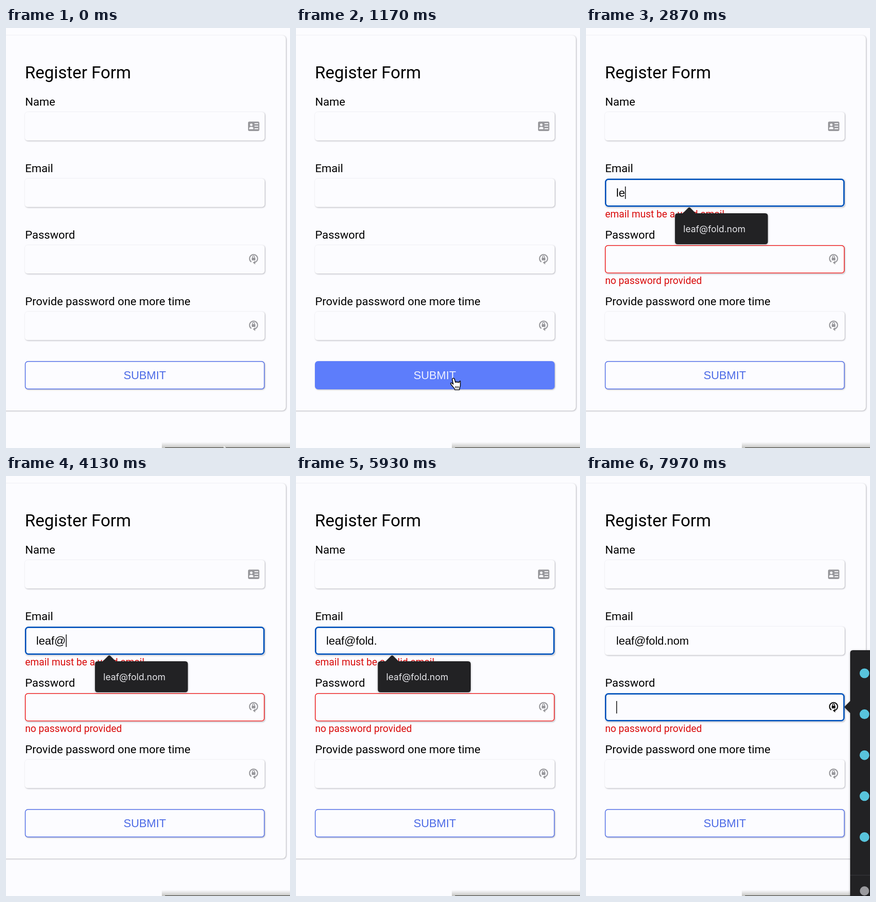
An HTML page that plays this animation: 616 px wide and 909 px high, repeating every 8 s.

```html
<!DOCTYPE html>
<html lang="en">
<head>
<meta charset="utf-8">
<title>Register form</title>
<style>
  html, body { margin: 0; width: 100%; height: 100%; overflow: hidden; background: #fcfcff; }
  svg { display: block; width: 100vw; height: 100vh; }
  text { font-family: Roboto, sans-serif; font-size: 24.5px; white-space: pre; }
  .title { font-size: 36.9px; }
  .error { font-size: 21.4px; fill: #d90b0b; }
  .arial { font-family: "Liberation Sans", Arial, sans-serif; font-size: 24.4px; }
  .hint { font-family: Inter, sans-serif; font-size: 19.6px; fill: #e6e6ea; }
  .card { fill: #fcfcff; filter: drop-shadow(1px 1px 1.5px rgba(40, 40, 50, .36)); }
  .dark { fill: #222224; filter: drop-shadow(0 1px 2px rgba(0, 0, 0, .3)); }
</style>
</head>
<body>
<svg id="stage" viewBox="0 0 616 909" preserveAspectRatio="none">
  <defs>
    <linearGradient id="fade" x2="0" y2="1">
      <stop offset="0" stop-color="#77776c" stop-opacity="0"/>
      <stop offset="1" stop-color="#77776c" stop-opacity=".42"/>
    </linearGradient>
    <g id="person">
      <rect x="525" y="202.5" width="24.5" height="20.5" rx="3" fill="#98989c"/>
      <g fill="#fcfcff">
        <circle cx="532" cy="209.5" r="2.7"/>
        <path d="M527.5 219v-2q0-3 4.500-3t4.500 3v2z"/>
        <path d="M539 206h8v2h-8zM539 211.500h8v2h-8zM539 217h8v2h-8z"/>
      </g>
    </g>
    <g id="lock">
      <path d="M-4.800 7.300A8.700 8.700 0 1 1 5 7.100Q3 8.600 0 8.700" fill="none" stroke="currentColor" stroke-width="2.300"/>
      <path d="M-1.500 8.700L3.500 4.700V12.700Z" fill="currentColor"/>
      <rect x="-4" y="-2" width="8" height="6" rx="1" fill="currentColor"/>
      <path d="M-2.300-2v-1.500a2.300 2.300 0 0 1 4.600 0V-2" fill="none" stroke="currentColor" stroke-width="1.500"/>
    </g>
  </defs>

  <rect width="616" height="909" fill="#fcfcff"/>
  <rect class="card" x="-30" y="16" width="637" height="812" rx="8"/>
  <rect x="338" y="896" width="278" height="13" fill="url(#fade)"/>
  <rect x="345" y="907.7" width="271" height="1.3" fill="#4b4b45"/>
  <text class="title" x="41" y="109">Register Form</text>
  <g id="form"></g>
  <use href="#person"/>
  <use id="lock1" href="#lock" x="537" y="499"/>
  <use href="#lock" x="537" y="643" color="#98989c"/>

  <rect id="button" class="card" x="41.750" y="721.750" width="518.500" height="59.500" rx="6" stroke-width="1.500"/>
  <text id="submit" class="arial" x="301" y="760" text-anchor="middle">SUBMIT</text>

  <text id="typed" class="arial" x="65.500" y="365"></text>
  <rect id="caret" width="1.600" height="27"/>
  <text id="emailError" class="error" x="41.500" y="409.500"></text>
  <text id="passError" class="error" x="41.500" y="553.500">no password provided</text>

  <g id="arrow">
    <path d="M0 0V21.500L5 17L8.800 25.500L12.800 23.700L9.200 15.500H16Z" fill="#000" stroke="#fff" stroke-width="1.500"/>
  </g>
  <g id="hand">
    <path d="M-2 1Q-2.500-2 .5-2Q2.500-2 3.200 1L4.800 7Q7 4.700 8.700 7Q11 5 12.500 7.500Q16-.5 15.500 9.500V14Q14 17 13.500 23H3.500Q2.500 19-1 16L-5 11Q-6.500 7.500-3.500 8L0 11Z"
      fill="#fff" stroke="#000" stroke-width="1.600" stroke-linejoin="round"/>
    <path d="M5 15v5M8 15v5M11 15v5" stroke="#000" stroke-width="1.200"/>
  </g>

  <g id="popup">
    <path class="dark" d="M199 401H210L221.500 389.500Q224 387 226.500 389.500L238 401H388.500Q394.500 401 394.500 407V462Q394.500 468 388.500 468H199Q193 468 193 462V407Q193 401 199 401Z"/>
    <text class="hint" x="211" y="442">leaf@fold.nom</text>
  </g>

  <g id="panel">
    <path class="dark" d="M573 383Q573 377 579 377H640V920H573V513L562 502Q560 500 562 498L573 487Z"/>
    <path d="M573 864H616" stroke="#3e3e42"/>
    <g id="marks" fill="#58c4dc"></g>
    <circle cx="604" cy="898" r="10" fill="#9a9a9e"/>
  </g>
</svg>
<script>
const LOOP = 8000;
const ADDRESS = "leaf@fold.nom";
const KEYS = [2560, 2740, 3080, 3260, 3950, 4480, 4660, 4880, 5060, 5420, 6120, 6300, 6480];
const SUBMIT = 1300, TAB = 7640;
const PATH = [[0, 473, 906], [120, 473, 906], [820, 341, 760], [1340, 341, 760], [1820, 233, 386]];
const NS = "http://www.w3.org/2000/svg";
const $ = id => document.getElementById(id);

function add(parent, tag, attrs, content = "") {
  const el = document.createElementNS(NS, tag);
  for (const key in attrs) el.setAttribute(key, attrs[key]);
  el.textContent = content;
  parent.append(el);
  return el;
}
const set = (id, attrs) => {
  for (const key in attrs) $(id).setAttribute(key, attrs[key]);
};
const show = (id, on) => set(id, { visibility: on ? "visible" : "hidden" });
const clamp = v => Math.max(0, Math.min(1, v));
const mix = (a, b, k) => a + (b - a) * k;
const color = (a, b, k) => `rgb(${a.map((v, i) => Math.round(mix(v, b[i], k)))})`;

const fields = ["Name", "Email", "Password", "Provide password one more time"].map((label, i) => {
  const y = 144 * i;
  add($("form"), "text", { x: 41.5, y: 168 + y }, label);
  add($("form"), "rect", { class: "card", x: 41, y: 182 + y, width: 520, height: 61.5, rx: 6 });
  return add($("form"), "rect", { fill: "none" });
});
for (let i = 0; i < 5; i++) add($("marks"), "circle", { cx: 604, cy: 427 + 88.6 * i, r: 10.5 });

function outline(i, stroke, width) {
  const y = 182 + 144 * i, inset = width / 2;
  const box = {
    x: 41 + inset, y: y + inset, width: 520 - width, height: 61 - width,
    rx: 6, stroke, "stroke-width": width
  };
  for (const key in box) fields[i].setAttribute(key, box[key]);
}

function pointer(t) {
  let i = 0;
  while (i < PATH.length - 2 && t > PATH[i + 1][0]) i++;
  const [t0, x0, y0] = PATH[i], [t1, x1, y1] = PATH[i + 1];
  const k = clamp((t - t0) / (t1 - t0)), ease = k * k * (3 - 2 * k);
  return [mix(x0, x1, ease), mix(y0, y1, ease)];
}

function render(t) {
  const [x, y] = pointer(t);
  const over = y > 721 && y < 782;
  const hover = clamp((t - 660) / 150) * (1 - clamp((t - 1450) / 150));
  set("button", {
    style: `fill:${color([252, 252, 255], [93, 125, 251], hover)}`,
    stroke: color([74, 105, 232], [93, 125, 251], hover)
  });
  set("submit", { fill: color([76, 106, 230], [238, 241, 255], hover) });
  const move = `translate(${x} ${y})`;
  set("arrow", { transform: move });
  set("hand", { transform: move });
  show("arrow", !over && t < KEYS[0]);
  show("hand", over && t < KEYS[0]);

  const sent = t >= SUBMIT, tabbed = t >= TAB;
  const count = KEYS.filter(k => t >= k).length;
  outline(1, sent && !tabbed ? "#0756bd" : "none", 3);
  outline(2, tabbed ? "#0756bd" : sent ? "#ef1717" : "none", tabbed ? 3 : 1.6);
  set("lock1", { color: tabbed ? "#111" : "#98989c" });
  $("typed").textContent = ADDRESS.slice(0, count);
  $("emailError").textContent = count ? "email must be a valid email" : "email is a required field";
  show("emailError", sent && count < 12);
  show("passError", sent);

  // The caret restarts its blink at every key press.
  const last = tabbed ? TAB : count ? KEYS[count - 1] : SUBMIT;
  show("caret", sent && (t - last) % 1000 < 500);
  set("caret", {
    x: 65.7 + (tabbed || !count ? 0 : $("typed").getComputedTextLength()),
    y: tabbed ? 487 : 343
  });

  show("popup", t >= 2060 && t < 6560);
  set("popup", { transform: `translate(${t < 5060 ? 0 : -15.5} 0)` });
  show("panel", t >= TAB + 80);
}

const start = performance.now();
function tick() {
  render((performance.now() - start) % LOOP);
  requestAnimationFrame(tick);
}
tick();
</script>
</body>
</html>
```
